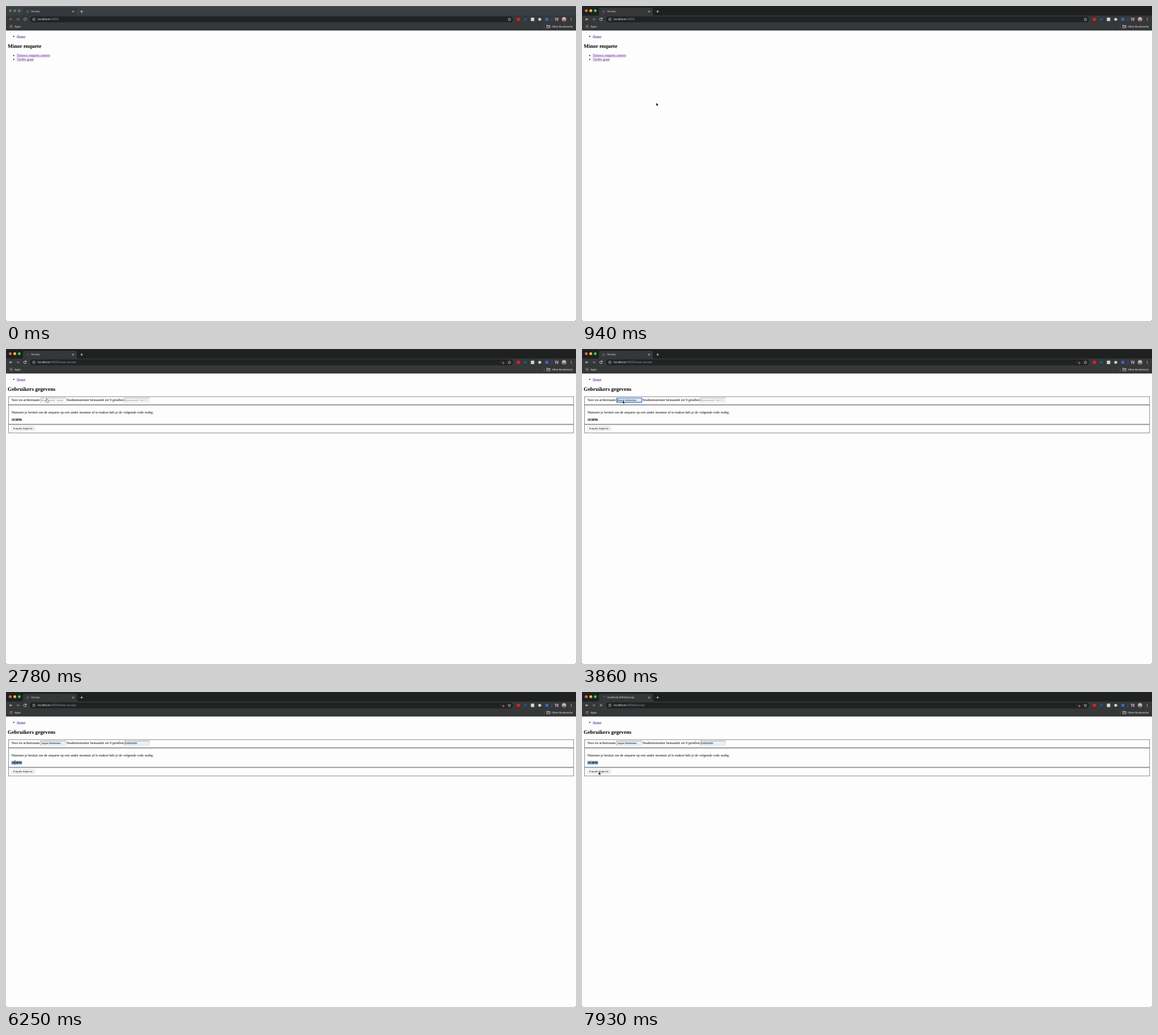
An HTML page for the animation above (8 s loop, 1006 px wide and 557 px high).

```html
<!DOCTYPE html>
<html lang="nl">
<head>
<meta charset="utf-8">
<title>Survey</title>
<style>
  html, body { margin: 0; width: 100%; height: 100%; overflow: hidden; background: #fdfdfd; }
  svg { display: block; width: 1006px; height: 557px; }
  text { text-rendering: geometricPrecision; white-space: pre; }
  .page text { font: 6.29px "Liberation Serif", "Times New Roman", serif; fill: #000; }
  .page .h { font-size: 9.43px; font-weight: bold; }
  .page .b { font-weight: bold; }
  .page .link { fill: #551a8b; }
  .page .ctl { font: 4.33px "Liberation Sans", Arial, sans-serif; }
  .page .hint { fill: #757575; }
  .ui { font: 4.5px Inter, Roboto, sans-serif; fill: #f1f3f4; }
  .url { font-size: 5.2px; }
  .icon { fill: none; stroke: #e4e6e8; stroke-width: .8; }
  .set { fill: none; stroke: #6f6f6f; stroke-width: .8; }
</style>
</head>
<body>
<svg viewBox="0 0 1006 557">
  <rect width="1006" height="557" fill="#fdfdfd"/>

  <g id="browser">
    <rect id="strip" width="1006" height="18"/>
    <rect id="edge" width="1006" height=".9"/>
    <path id="tab" d="M27 17Q30 17 30 14V6Q30 3 33 3H122Q125 3 125 6V14Q125 17 128 17Z"/>
    <rect y="16.8" width="1006" height="26" fill="#353739"/>
    <rect y="42.3" width="1006" height="1" fill="#1d1f20"/>
    <rect x="42" y="18.4" width="853" height="10.4" rx="5.2" fill="#1f2223"/>
    <g id="lights"><circle cx="7.6" cy="8.3" r="2.5"/><circle cx="15.5" cy="8.3" r="2.5"/><circle cx="23.4" cy="8.3" r="2.5"/></g>

    <g id="globe" class="icon" style="stroke:#777c7f;stroke-width:.6"><circle cx="38.3" cy="10" r="2.2"/><path d="M36.8 11.5L39.8 8.5"/></g>
    <path id="spin" class="icon" style="stroke:#b9bec2;stroke-width:.6" d="M38.3 7.8A2.2 2.2 0 0 1 40.5 10"/>
    <text id="title" class="ui" x="44.6" y="11.4"></text>
    <path class="icon" d="M117 8.3L120 11.3M120 8.3L117 11.3M131.2 9.8H135.8M133.5 7.5V12.1"/>

    <path id="back" class="icon" d="M11.3 23.5H6.2M8.7 21L6.2 23.5L8.7 26"/>
    <path class="icon" style="stroke:#8b8f92" d="M18 23.5H23.1M20.6 21L23.1 23.5L20.6 26"/>
    <g id="reload"><path class="icon" d="M35.4 22.1A2.3 2.3 0 1 0 35.8 24.2"/><path d="M36.2 20.7V23.2H33.7Z" fill="#e4e6e8"/></g>
    <path id="stop" class="icon" d="M31.5 21.4L35.7 25.6M35.7 21.4L31.5 25.6"/>
    <circle class="icon" style="stroke-width:.6" cx="49.3" cy="23.5" r="2.3"/>
    <path class="icon" style="stroke-width:.6" d="M49.3 23.2V24.9M49.3 22V22.6"/>
    <text class="ui url" x="56" y="25.4">localhost<tspan id="path" fill="#9aa0a6"></tspan></text>

    <g id="blocked">
      <path class="icon" style="stroke:#8d9194;stroke-width:.6" d="M874.8 22L873.3 23.5L874.8 25M877.5 22L878.6 23"/>
      <rect x="876.4" y="23.6" width="3" height="2.7" fill="#d9534a"/>
    </g>
    <path class="icon" style="stroke-width:.6" d="M888.4 20.9L889.2 22.7L891.1 22.9L889.7 24.2L890.1 26.1L888.4 25.1L886.7 26.1L887.1 24.2L885.7 22.9L887.6 22.7Z"/>
    <circle cx="904.3" cy="23.5" r="2.9" fill="#d8231f"/>
    <circle cx="916.7" cy="23.6" r="2.4" fill="#17608a"/>
    <rect x="926.3" y="20.6" width="6" height="6" fill="#d4d7d5"/>
    <circle cx="942" cy="23.5" r="2.6" fill="#d0d3d3"/>
    <rect x="951.6" y="20.8" width="5.8" height="5.2" fill="#3d63b8"/>
    <path d="M963.5 20V27M949.7 32.6V39.6" stroke="#626669" stroke-width=".6"/>
    <path class="icon" d="M968.8 21.4H973M968.8 23.2H973M968.8 25H971.2M974 25.5V21.5H975.4"/>
    <circle cx="973.2" cy="25.4" r=".9" fill="#e4e6e8"/>
    <circle cx="984.9" cy="23.4" r="3.9" fill="#bfa195"/>
    <path d="M982 26A3 2.6 0 0 1 987.8 26A3.9 3.9 0 0 1 982 26Z" fill="#786f70"/>
    <circle cx="984.9" cy="22.3" r="1.5" fill="#e0c4b5"/>
    <g fill="#e4e6e8"><circle cx="997.5" cy="21.7" r=".6"/><circle cx="997.5" cy="23.7" r=".6"/><circle cx="997.5" cy="25.7" r=".6"/></g>

    <g id="apps"></g>
    <text class="ui" x="15" y="37.9">Apps</text>
    <path class="icon" style="stroke-width:.7" d="M954.6 38.6V33.8H956.8L957.5 34.6H960V38.6ZM954.6 35.8H960"/>
    <text class="ui" x="963.2" y="37.9">Other Bookmarks</text>
  </g>

  <g class="page">
    <circle cx="13.6" cy="53.8" r="1"/>
    <text class="link" x="18.9" y="55.5">Home</text>
    <path d="M18.9 56.3H34.1" stroke="#551a8b" stroke-width=".5"/>

    <g id="start">
      <text class="h" x="3.1" y="73.5">Minor enquete</text>
      <circle cx="13.6" cy="87.4" r="1"/><circle cx="13.6" cy="94.5" r="1"/>
      <text class="link" x="18.9" y="89.1">Nieuwe enquete starten</text>
      <text class="link" x="18.9" y="96.2">Verder gaan</text>
      <path d="M18.9 89.9H77.7M18.9 97H48.9" stroke="#551a8b" stroke-width=".5"/>
    </g>

    <g id="form">
      <text class="h" x="3.1" y="73.5">Gebruikers gegevens</text>
      <rect class="set" x="4.4" y="84.2" width="997.4" height="14.2"/>
      <rect class="set" x="4.4" y="99.1" width="997.4" height="33.9"/>
      <rect class="set" x="4.4" y="133.8" width="997.4" height="14.5"/>
      <text x="9.4" y="92.1">Voor en achternaam</text>
      <text x="106.8" y="92.1">Studentnummer bestaande uit 9 getallen</text>
      <g id="fields"></g>
      <text x="9.4" y="113.8">Wanneer je besluit om de enquete op een ander moment af te maken heb je de volgende code nodig.</text>
      <rect id="mark" x="9.4" y="121.5" width="18.9" height="7.1" fill="#a8cdf3"/>
      <text class="b" x="9.4" y="127.2">103896</text>
      <rect x="9.8" y="137.2" width="40.8" height="6.6" rx=".8" fill="#fff" stroke="#b5b5b5" stroke-width=".5"/>
      <text class="ctl" x="12.6" y="142">Enquete beginnen</text>
    </g>
  </g>

  <path d="M0 555.2V557H1.8Q.3 556.7 0 555.2ZM1006 555.2V557H1004.2Q1005.7 556.7 1006 555.2Z" fill="#333"/>

  <g id="cursor">
    <path id="arrow" d="M0 0V5.7L1.3 4.5L2.2 6.6L3.2 6.2L2.3 4.1H4.1Z" fill="#000" stroke="#fff" stroke-width=".4"/>
    <path id="hand" d="M-.6 .5Q0 -.3 .6 .5V2.6L3 3.2Q3.8 3.5 3.6 4.4L3 6.8H-.3L-2.2 4.3Q-2.2 3.4 -1.3 3.8L-.6 4.4Z" fill="#fff" stroke="#222" stroke-width=".55"/>
    <path id="beam" d="M-1.3 -3.2Q0 -3.2 0 -2.4Q0 -3.2 1.3 -3.2M0 -2.4V2.4M-1.3 3.2Q0 3.2 0 2.4Q0 3.2 1.3 3.2" fill="none" stroke="#222" stroke-width=".6"/>
  </g>
</svg>

<script>
const LOOP = 8000;
const $ = id => document.getElementById(id);
const show = (id, on) => { $(id).style.display = on ? '' : 'none'; };
const within = (t, a, b) => t >= a && t < b;

// Coloured dots of the bookmark bar button
const dotColors = ['#e0584c', '#6aa84f', '#e5a63a'];
$('apps').innerHTML = [0, 1, 2].map(r => [0, 1, 2].map(c =>
  `<rect x="${6 + c * 1.9}" y="${33.7 + r * 1.8}" width="1.2" height="1.2" fill="${dotColors[c]}"/>`
).join('')).join('');

// Input fields: each one has a fill time, and a focus and caret interval
const fields = [
  { x: 61.2, hint: 'Bijvoorbeeld: Jasper', value: 'Jasper Molendam', fill: 3780, focus: [3470, 4500], caret: [3470, 4010] },
  { x: 208.9, hint: 'Bijvoorbeeld: 500773', value: '500000000', fill: 4810, focus: [4500, 6100], caret: [4810, 5340] }
];
$('fields').innerHTML = fields.map(({ x }, i) => `
  <clipPath id="clip${i}"><rect x="${x}" y="86" width="43.8" height="9"/></clipPath>
  <rect id="box${i}" x="${x}" y="86.7" width="44.2" height="7.4" stroke="#c4c4c4" stroke-width=".5"/>
  <path id="shade${i}" d="M${x} 94V86.7H${x + 44.2}" fill="none" stroke="#858585" stroke-width=".6"/>
  <rect id="ring${i}" x="${x}" y="86.6" width="44.2" height="7.6" rx=".8" fill="none" stroke="#3b82e0" stroke-width="1.4"/>
  <text id="text${i}" class="ctl" x="${x + 1.2}" y="92" clip-path="url(#clip${i})"></text>
  <path id="caret${i}" d="M${x + 1.3} 87.8V92.9" stroke="#000" stroke-width=".5"/>`).join('');

// Pointer: from, to, steps, x, y, shape
const moves = [
  [80, 310, 4, 146, 182, 'arrow'],
  [550, 620, 2, 125, 177, 'arrow'],
  [940, 940, 1, 131, 171, 'arrow'],
  [1010, 1090, 2, 150, 178, 'arrow'],
  [1320, 1830, 8, 80, 98, 'arrow'],
  [1900, 2060, 3, 71.8, 88.5, 'hand'],
  [2130, 2270, 3, 71.8, 87.5, 'hand'],
  [3160, 3320, 3, 72, 90.3, 'beam'],
  [3700, 3860, 3, 72, 91, 'arrow'],
  [4010, 4090, 2, 76, 104, 'arrow'],
  [4170, 4330, 3, 216, 90.3, 'beam'],
  [4810, 4810, 1, 216, 90.3, ''],
  [5500, 6020, 8, 15.6, 124.6, 'beam'],
  [6640, 7260, 9, 29.5, 141, 'arrow']
];

function pointerAt(t) {
  let x = 420, y = 430, shape = '';
  for (const [from, to, n, tx, ty, s] of moves) {
    if (t < from) break;
    const step = n > 1 ? Math.min(n, 1 + Math.floor((t - from) / (to - from) * (n - 1) + .01)) : 1;
    const p = step / n, k = p * (2 - p);
    x += (tx - x) * k;
    y += (ty - y) * k;
    shape = s;
  }
  return { x, y, shape };
}

function drawBrowser(t) {
  const active = t >= 940;
  const leaving = within(t, 2610, 2690), sending = t >= 7840;
  const loading = leaving || sending;
  const path = sending ? ':4000/survey' : t >= 2610 ? ':4000/new-survey' : ':4000';
  $('strip').setAttribute('fill', active ? '#1e2120' : '#3a4041');
  $('edge').setAttribute('fill', active ? '#252d2a' : '#4b6565');
  $('tab').setAttribute('fill', active ? '#353739' : '#36393b');
  const lights = active ? ['#fb5c55', '#fcbc40', '#34c84a'] : Array(3).fill('#6a6f70');
  [...$('lights').children].forEach((c, i) => c.setAttribute('fill', lights[i]));
  $('back').style.stroke = active ? '#e4e6e8' : '#8b8f92';
  $('reload').style.opacity = active ? 1 : .65;
  $('path').textContent = path;
  $('title').textContent = loading ? 'localhost' + path : 'Survey';
  show('reload', !loading);
  show('stop', loading);
  show('spin', loading);
  show('globe', !loading);
  $('globe').style.opacity = within(t, 2690, 2930) ? .45 : 1;
  show('blocked', t >= 2690);
}

function drawPage(t) {
  show('start', t < 2690);
  show('form', t >= 2690);
  show('mark', t >= 6180);
  fields.forEach((f, i) => {
    const filled = t >= f.fill, focused = within(t, ...f.focus);
    $('box' + i).setAttribute('fill', filled ? '#e8f0fb' : '#fff');
    $('text' + i).textContent = filled ? f.value : f.hint;
    $('text' + i).classList.toggle('hint', !filled);
    show('ring' + i, focused);
    show('shade' + i, !focused);
    show('caret' + i, within(t, ...f.caret));
  });
}

function drawPointer(t) {
  const { x, y, shape } = pointerAt(t);
  $('cursor').setAttribute('transform', `translate(${x} ${y})`);
  for (const id of ['arrow', 'hand', 'beam']) show(id, id === shape);
}

const begin = performance.now();
function frame() {
  const t = (performance.now() - begin) % LOOP;
  drawBrowser(t);
  drawPage(t);
  drawPointer(t);
  requestAnimationFrame(frame);
}
frame();
</script>
</body>
</html>
```
